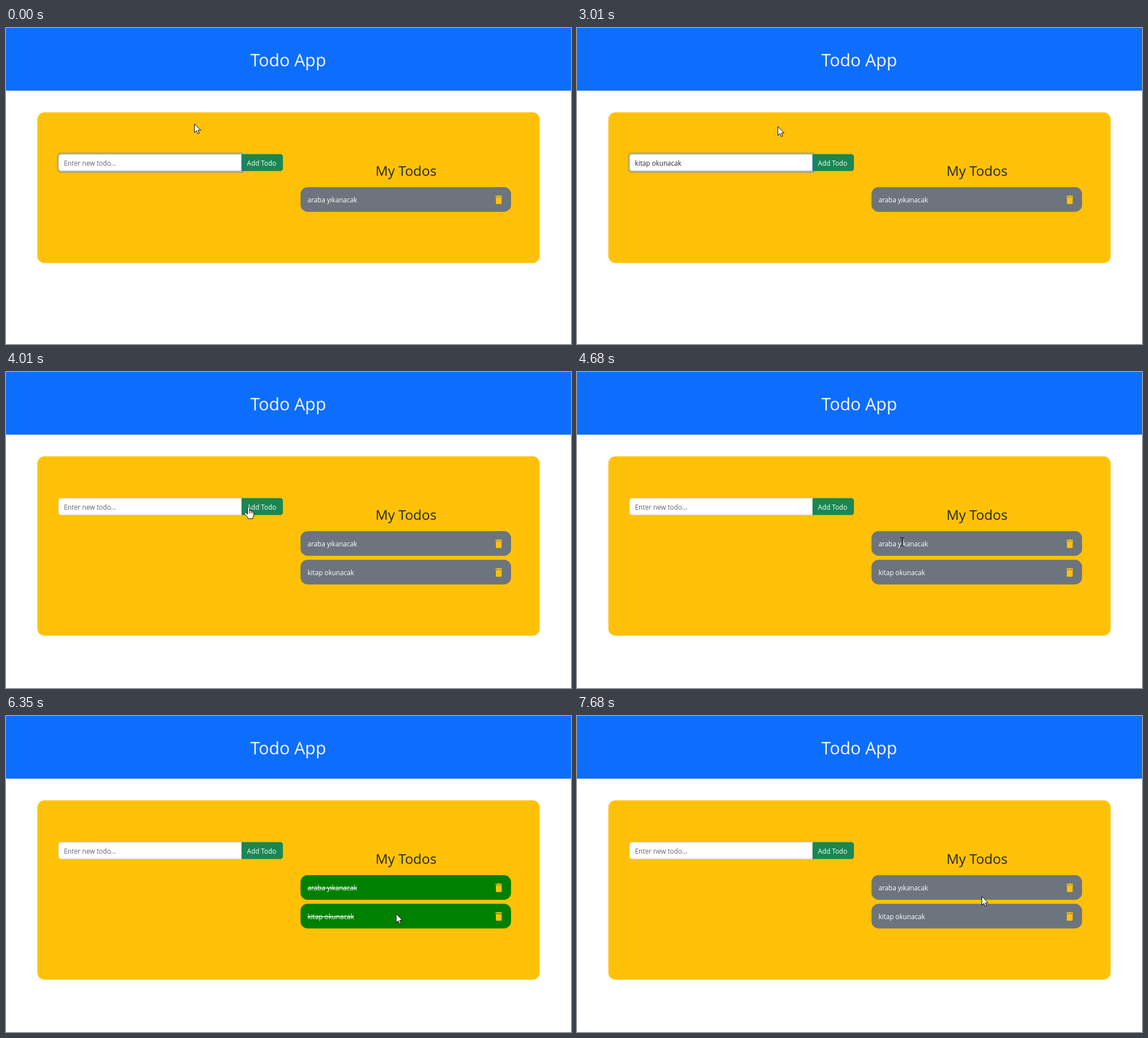
Recreate the animation shown at these times as an HTML page. Size 1000 by 560 pixels, loop 8 s.

```html
<!DOCTYPE html>
<html lang="en">
<head>
<meta charset="utf-8">
<title>Todo App</title>
<style>
  html, body { margin: 0; width: 100%; height: 100%; overflow: hidden; background: #fff; }
  svg { display: block; width: 100vw; height: 100vh; }
  text { font: 400 11.7px "Open Sans", "Noto Sans", sans-serif; white-space: pre; }
  .title { font-size: 30.3px; font-weight: 500; fill: #f8f9fa; text-anchor: middle; }
  .heading { font-size: 24.3px; font-weight: 500; fill: #212529; text-anchor: middle; }
  .label { fill: #fff; }
  .item rect { fill: #6c757d; }
  .item path { fill: #ffc107; }
  .done rect { fill: #008000; }
  .done text { text-decoration: line-through; }
  .pointer { fill: #fff; stroke: #000; stroke-linejoin: round; }
</style>
</head>
<body>
<svg viewBox="0 0 1000 560">
  <rect width="1000" height="560" fill="#fff"/>
  <rect width="1000" height="111" fill="#0d6efd"/>
  <text class="title" x="499.5" y="67.5">Todo App</text>

  <rect id="card" x="55.5" y="149.5" width="889" height="267" rx="12.5" fill="#ffc107"/>

  <path d="M416.5 223.5H485.5a4.6 4.6 0 0 1 4.6 4.6V249a4.6 4.6 0 0 1-4.6 4.6H416.5Z" fill="#198754"/>
  <text class="label" x="426.6" y="243.6">Add Todo</text>
  <path id="ring" d="M420 220.2H97.5a7.5 7.5 0 0 0-7.5 7.5V249.4a7.5 7.5 0 0 0 7.5 7.5H420ZM417 223.4V253.6H97a4.3 4.3 0 0 1-4.3-4.3V227.7a4.3 4.3 0 0 1 4.3-4.3Z"
        fill="#0d6efd" fill-opacity=".25" fill-rule="evenodd"/>
  <path id="field" d="M416.6 223.8H97.2a4.2 4.2 0 0 0-4.2 4.2V249a4.2 4.2 0 0 0 4.2 4.2H416.6Z" fill="#fff" stroke-width=".8"/>
  <text id="entry" x="102.6" y="243.6"></text>
  <rect id="caret" y="230.5" width="1" height="16.5" fill="#000"/>

  <text class="heading" x="708" y="261.6">My Todos</text>
  <g id="list"></g>

  <path id="arrow" class="pointer" d="M.6.8V16.4L4.2 13 6.6 18.5 9 17.4 6.7 12.1H11.6Z"/>
  <g id="hand" class="pointer">
    <path d="M6.7 14V2.4C6.7.1 10 .1 10 2.4V8.2C10.4 6.7 13 7 13 8.8 13.5 7.7 15.6 8 15.6 9.6 16.2 8.8 17.7 9.2 17.7 10.8V15.2C17.7 18 15.8 18.6 15.8 22H7.6C7.3 19 3.1 16 1 13 .2 11.2 2 10 3.6 11.3L6.7 14Z"/>
    <path d="M10 8V12.5M13 9V12.5M15.6 10V12.5" fill="none"/>
  </g>
  <path id="beam" d="M0 .5H3M4 .5H7M3.5 1V15M0 15.5H3M4 15.5H7" fill="none" stroke="#000"/>
</svg>
<script>
const LOOP = 8000;
const $ = id => document.getElementById(id);
const shapes = ["arrow", "hand", "beam"];

const typing = [[0, ""], [670, "ki"], [1000, "kita"], [1340, "kitap "], [1670, "kitap o"],
  [2000, "kitap okun"], [2340, "kitap okunacak"], [4010, ""]];
const caretOn = [[0, false], [330, true], [3010, false], [3340, true], [4010, false]];
const pointer = [
  [0, "arrow", 333, 169], [3010, "arrow", 355, 174], [3340, "beam", 408, 217],
  [3670, "hand", 421, 238], [4340, "hand", 427, 232], [4680, "beam", 572, 293],
  [5010, "beam", 608, 350], [5340, "arrow", 665, 328], [5680, "arrow", 677, 307],
  [6010, "arrow", 693, 360], [6350, "arrow", 690, 350], [7350, "arrow", 712, 311],
  [7680, "arrow", 716, 319]
];
const todos = [
  { text: "araba yıkanacak", added: 0, done: 6010, undone: 7680 },
  { text: "kitap okunacak", added: 4010, done: 5010, undone: 7350 }
];

const trash = "M6 19c0 1.1.9 2 2 2h8c1.1 0 2-.9 2-2V7H6v12zM19 4h-3.5l-1-1h-5l-1 1H5v2h14V4z";
$("list").innerHTML = todos.map((todo, i) => `
  <g class="item" transform="translate(521.3 ${282 + i * 50.8})">
    <rect width="372.6" height="43.7" rx="12.5"/>
    <text class="label" x="12.4" y="27.2">${todo.text}</text>
    <path transform="translate(340.6 12.1) scale(.855)" d="${trash}"/>
  </g>`).join("");
const items = [...$("list").children];

const show = (el, on) => el.setAttribute("visibility", on ? "visible" : "hidden");
const at = (steps, t) => steps.filter(step => step[0] <= t).pop();

function draw(t) {
  const text = at(typing, t)[1];
  const focused = t < 4010;
  const entry = $("entry");
  entry.textContent = text || "Enter new todo...";
  entry.setAttribute("fill", text ? "#212529" : "#5f666d");
  const end = text ? entry.getComputedTextLength() : 0;
  $("caret").setAttribute("x", Math.round(102.4 + end));
  show($("caret"), at(caretOn, t)[1]);
  show($("ring"), focused);
  $("field").setAttribute("stroke", focused ? "#86b7fe" : "#ced4da");

  $("card").setAttribute("height", t < todos[1].added ? 267 : 317.7);
  todos.forEach((todo, i) => {
    show(items[i], t >= todo.added);
    items[i].classList.toggle("done", t >= todo.done && t < todo.undone);
  });

  const [, shape, x, y] = at(pointer, t);
  shapes.forEach(id => show($(id), id === shape));
  $(shape).setAttribute("transform", `translate(${x} ${y})`);
}

const start = performance.now();
function tick() {
  draw((performance.now() - start) % LOOP);
  requestAnimationFrame(tick);
}
tick();
</script>
</body>
</html>
```
